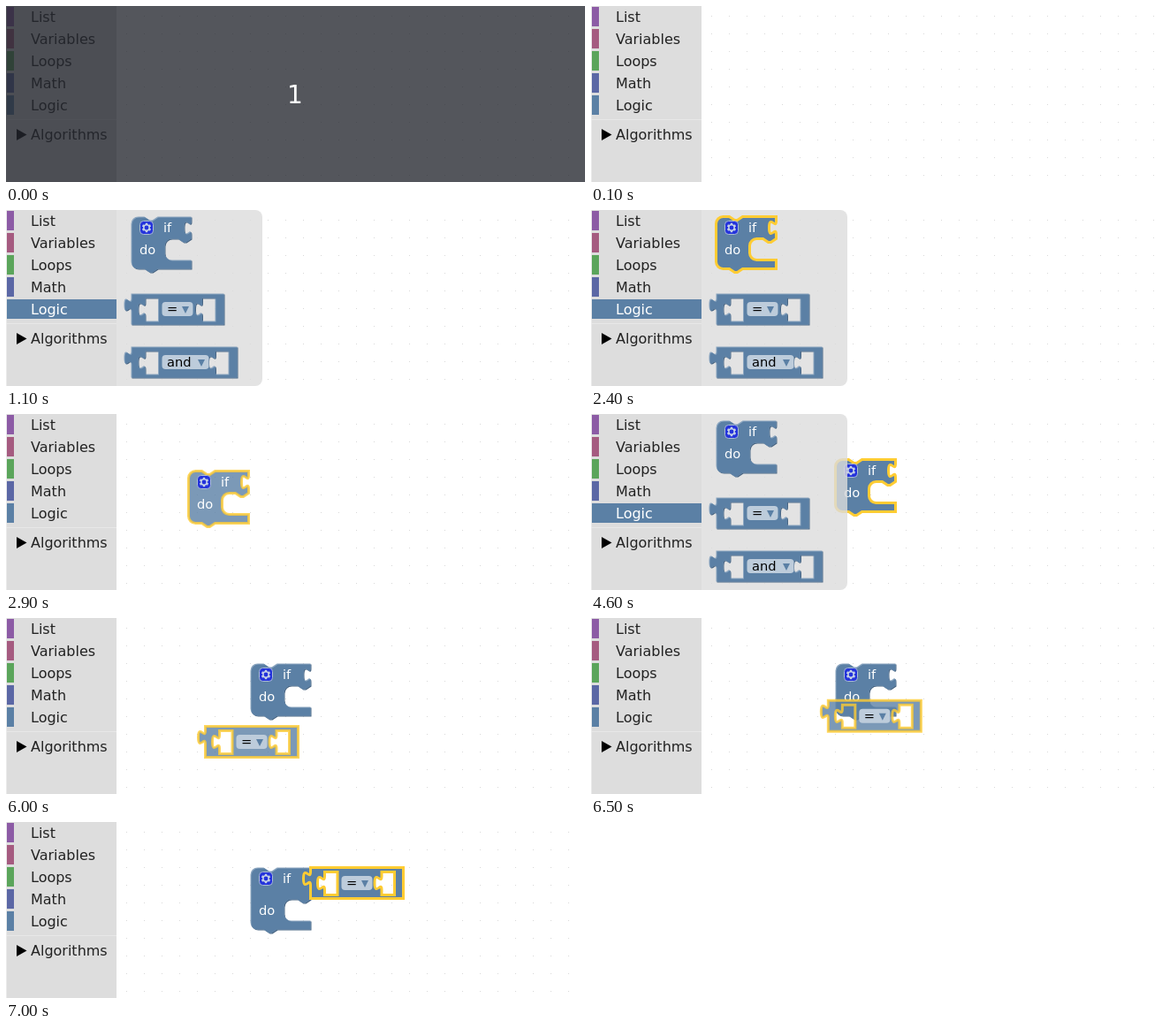
Write an HTML page with a canvas that moves like this. It is 655 by 199 pixels and loops after 8 s.

```html
<!DOCTYPE html>
<html lang="en">
<head>
<meta charset="utf-8">
<title>Block editor</title>
<style>
  html, body { margin: 0; width: 100%; height: 100%; overflow: hidden; background: #fff; }
  canvas { display: block; }
</style>
</head>
<body>
<canvas id="stage" width="655" height="199"></canvas>
<script>
const ctx = document.getElementById('stage').getContext('2d');
const W = 655, H = 199, LOOP = 8000, STEP = 100;
const FONT = '"DejaVu Sans", sans-serif';
const BLUE = '#5b80a5', LIGHT = '#8ca6c0', DARK = '#496684', GOLD = '#ffcc33';
const CATEGORIES = [
  ['List', '#8c5ba5'], ['Variables', '#a55b80'], ['Loops', '#5ba55b'],
  ['Math', '#5b67a5'], ['Logic', BLUE]
];

// Drag paths: [time, x, y]
const IF_PATH = [[2600, 158, 24], [2900, 206.5, 64.5], [3400, 275.5, 58], [3600, 280.5, 51.5]];
const EQ_PATH = [[5700, 145.5, 99], [5800, 145.5, 99], [5900, 190, 115], [6000, 225.5, 122.5],
  [6400, 258, 104], [6700, 289, 72], [6800, 319, 58], [6900, 345, 50]];
const IF_HOME = [276.5, 51.5], EQ_HOME = [344.5, 51.5];

const TAB = 'v 5 c 0,10 -8,-8 -8,7.5 s 8,-2.5 8,7.5';

function ifShape(row) {
  return new Path2D(`M 0,8 a 8,8 0 0,1 8,-8 H 15 l 6,4 h 3 l 6,-4 H 68 ${TAB} V ${row}
    l -6,4 h -3 l -6,-4 h -7 a 8,8 0 0,0 -8,8 v 8 a 8,8 0 0,0 8,8 H 68 v 10
    H 30 l -6,4 h -3 l -6,-4 H 8 a 8,8 0 0,1 -8,-8 z`);
}

function valueShape(width) {
  const hole = right => `M ${right},5 h -14.5 ${TAB} v 6 h 14.5 z`;
  return new Path2D(`M 0,0 H ${width} V 35 H 0 V 20 c 0,-10 -8,8 -8,-7.5 s 8,2.5 8,-7.5 z
    ${hole(30.5)} ${hole(width - 10)}`);
}

const IF_SHORT = ifShape(25), IF_TALL = ifShape(36);
const EQ_SHAPE = valueShape(105), AND_SHAPE = valueShape(120);

function rect(x, y, w, h, color) {
  ctx.fillStyle = color;
  ctx.fillRect(x, y, w, h);
}

function text(str, x, y, size, color) {
  ctx.font = `${size}px ${FONT}`;
  ctx.fillStyle = color;
  ctx.fillText(str, x, y);
}

function triangle(ax, ay, bx, by, cx, cy, color) {
  ctx.fillStyle = color;
  ctx.beginPath();
  ctx.moveTo(ax, ay);
  ctx.lineTo(bx, by);
  ctx.lineTo(cx, cy);
  ctx.fill();
}

function fillAt(shape, d, color) {
  ctx.save();
  ctx.translate(d, d);
  ctx.fillStyle = color;
  ctx.fill(shape, 'evenodd');
  ctx.restore();
}

// mode: 'rest' is bevelled, 'selected' is outlined, 'drag' is outlined and translucent
function body(shape, mode) {
  ctx.save();
  if (mode === 'rest') {
    fillAt(shape, 1, DARK);
    fillAt(shape, 0, LIGHT);
    ctx.clip(shape, 'evenodd');
    fillAt(shape, 1, BLUE);
  } else {
    if (mode === 'drag') ctx.globalAlpha = 0.8;
    fillAt(shape, 0, BLUE);
    ctx.strokeStyle = GOLD;
    ctx.lineWidth = 3;
    ctx.stroke(shape);
  }
  ctx.restore();
}

function disc(r, color) {
  ctx.fillStyle = color;
  ctx.beginPath();
  ctx.arc(0, 0, r, 0, Math.PI * 2);
  ctx.fill();
}

function gear(x, y) {
  const ink = '#2433db', pale = '#c3d0e6';
  ctx.save();
  ctx.translate(x, y);
  ctx.beginPath();
  ctx.roundRect(-7.5, -7.5, 15, 15, 4);
  ctx.fillStyle = ink;
  ctx.fill();
  ctx.lineWidth = 1;
  ctx.strokeStyle = '#a9bbd6';
  ctx.stroke();
  disc(3.9, pale);
  for (let i = 0; i < 6; i++) {
    ctx.rotate(Math.PI / 3);
    rect(-1.2, -5.2, 2.4, 3, pale);
  }
  disc(2.4, ink);
  ctx.restore();
}

function at(pos, draw) {
  ctx.save();
  ctx.translate(pos[0], pos[1]);
  draw();
  ctx.restore();
}

function ifBlock(pos, mode, tall = false) {
  at(pos, () => {
    body(tall ? IF_TALL : IF_SHORT, mode);
    gear(17.5, 12.5);
    text('if', 36.5, 17.5, 14.67, '#fff');
    text('do', 9.5, tall ? 53 : 42, 14.67, '#fff');
  });
}

function valueBlock(pos, mode, label, shape, fieldWidth) {
  at(pos, () => {
    body(shape, mode);
    ctx.beginPath();
    ctx.roundRect(35, 9.5, fieldWidth, 16, 4);
    ctx.fillStyle = '#bdccdb';
    ctx.fill();
    text(label, 40.5, 22.5, 14.67, '#000');
    const mid = 35 + fieldWidth - 8.5;
    triangle(mid - 4, 14.5, mid + 4, 14.5, mid, 22.5, BLUE);
  });
}

const eqBlock = (pos, mode) => valueBlock(pos, mode, '=', EQ_SHAPE, 35);
const andBlock = (pos, mode) => valueBlock(pos, mode, 'and', AND_SHAPE, 53);

function along(path, t) {
  let i = 1;
  while (i < path.length - 1 && path[i][0] < t) i++;
  const [t0, x0, y0] = path[i - 1], [t1, x1, y1] = path[i];
  const k = Math.min(1, Math.max(0, (t - t0) / (t1 - t0)));
  return [x0 + (x1 - x0) * k, y0 + (y1 - y0) * k];
}

function grid() {
  for (let x = 136; x < W; x += 20)
    for (let y = 11; y < H; y += 20) rect(x, y, 1, 1, '#d9d9d9');
}

function toolbox(open, lit) {
  rect(0, 0, 125, H, '#ddd');
  rect(0, 0, 1, H, '#ececec');
  CATEGORIES.forEach(([name, color], i) => {
    const y = 1 + i * 25, logic = name === 'Logic';
    rect(1, y, logic && open ? 124 : 8, 22, color);
    text(name, 28, y + 17, 16, logic && lit ? '#fff' : '#222');
  });
  rect(1, 128, 124, 1, '#e8e8e8');
  triangle(12, 139, 23.5, 145.5, 12, 152, '#000');
  text('Algorithms', 28, 151, 16, '#222');
}

function flyout(t) {
  ctx.beginPath();
  ctx.roundRect(125, 0, 165, H, [0, 8, 8, 0]);
  ctx.fillStyle = 'rgba(221,221,221,0.8)';
  ctx.fill();
  ifBlock([141.5, 7.5], t >= 2400 && t < 2600 ? 'selected' : 'rest');
  eqBlock([141.5, 94.5], t >= 5600 ? 'selected' : 'rest');
  andBlock([141.5, 154.5], 'rest');
}

function workspaceBlocks(t) {
  if (t < 2600) return;
  if (t < 3700) {
    ifBlock(along(IF_PATH, t), 'drag');
    return;
  }
  ifBlock(IF_HOME, t < 5600 ? 'selected' : 'rest', t >= 6700);
  if (t < 5700) return;
  if (t >= 7000) {
    eqBlock(EQ_HOME, 'selected');
    return;
  }
  // landing preview
  if (t >= 6700) at(EQ_HOME, () => fillAt(EQ_SHAPE, 0, 'rgba(0,0,0,0.2)'));
  eqBlock(along(EQ_PATH, t), 'drag');
}

function draw(t) {
  const within = (a, b) => t >= a && t < b;
  const open = within(1100, 2600) || within(4600, 5700);
  const lit = within(900, 2600) || within(4400, 5700);
  rect(0, 0, W, H, '#fff');
  grid();
  workspaceBlocks(t);
  if (open) flyout(t);
  toolbox(open, lit);
  if (t < 100) {
    rect(0, 0, W, H, 'rgba(36,39,47,0.78)');
    ctx.textAlign = 'center';
    text('1', 327, 110, 28, '#fff');
    ctx.textAlign = 'left';
  }
}

const start = performance.now();
function tick() {
  const t = (performance.now() - start) % LOOP;
  draw(Math.floor(t / STEP) * STEP);
  requestAnimationFrame(tick);
}
tick();
</script>
</body>
</html>
```
